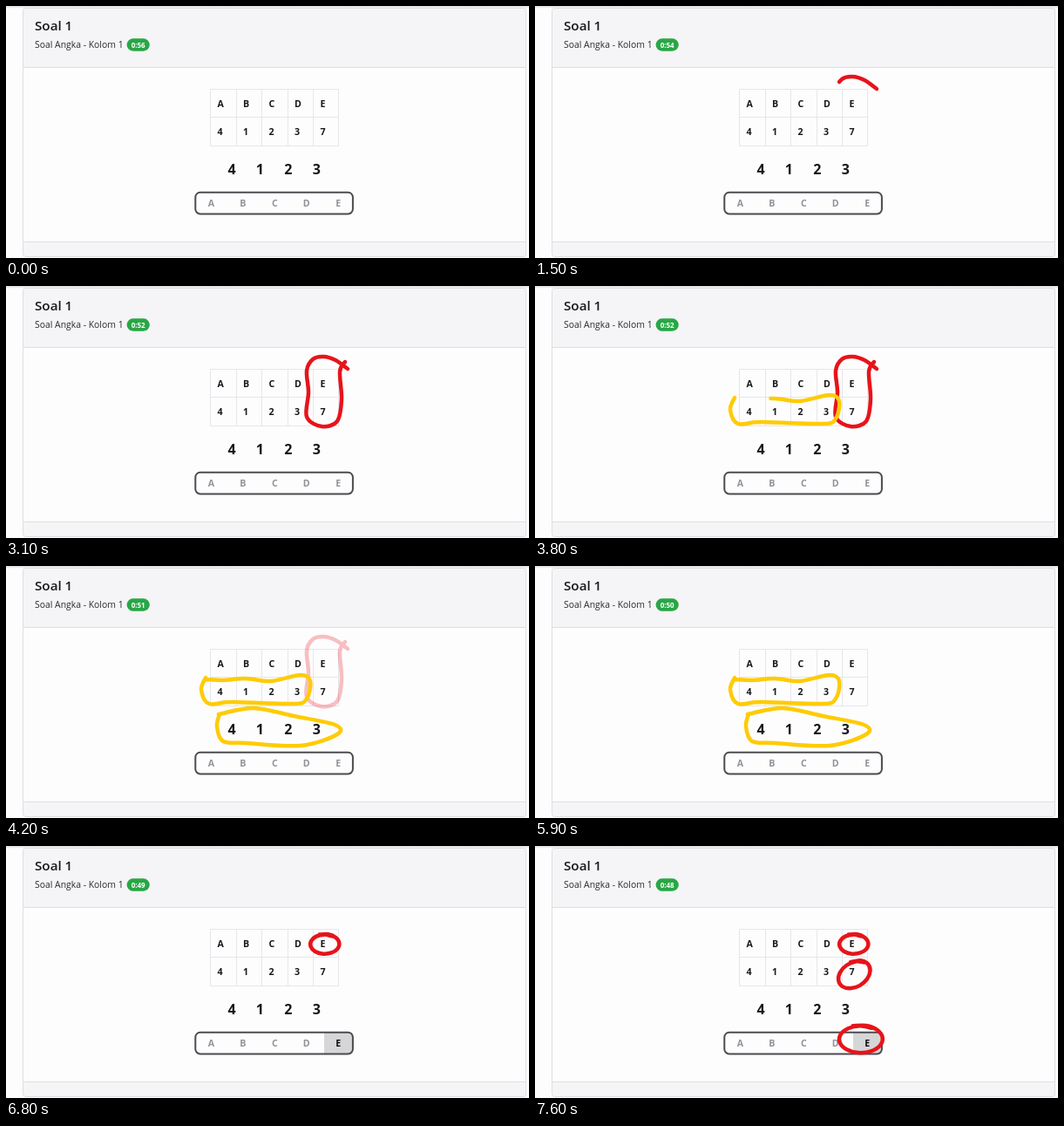
Recreate the animation shown at these times as an HTML page. Size 600 by 289 pixels, loop 8 s.

```html
<!DOCTYPE html>
<html lang="id">
<head>
<meta charset="utf-8">
<title>Soal Angka</title>
<style>
  html, body { margin: 0; width: 100%; height: 100%; overflow: hidden; background: #fefdfe; }
  svg { display: block; width: 100%; height: 100%; font-family: "Open Sans", "Noto Sans", sans-serif; fill: #17181c; }
  .panel { fill: #f5f4f6; }
  .card { fill: none; stroke: #dedde0; }
  .line { fill: none; stroke: #e6e5ea; }
  .cell, .big, .option { font-weight: 700; font-size: 10.6px; }
  .big, .option, #clock { text-anchor: middle; }
  .big { font-size: 16px; }
  .option { fill: #929297; }
  .option.on { fill: #0c0c0e; }
  #ink path { fill: none; stroke-width: 4.5; stroke-linecap: round; stroke-linejoin: round; }
</style>
</head>
<body>
<svg viewBox="0 0 600 289" preserveAspectRatio="none">
  <defs>
    <linearGradient id="shade" x2="0" y2="1">
      <stop stop-color="#dcdbde"/>
      <stop offset="1" stop-color="#fefdfe"/>
    </linearGradient>
  </defs>
  <rect width="600" height="3" fill="url(#shade)"/>
  <rect class="panel" x="20" y="3" width="577" height="67"/>
  <rect class="panel" x="20" y="271" width="577" height="16"/>
  <rect class="card" x="19.5" y="2.5" width="577" height="285" rx="3"/>
  <path class="card" d="M20 70.5H597M20 270.5H597"/>

  <text x="33" y="28" font-size="15.2" font-weight="600">Soal 1</text>
  <text x="33" y="48" font-size="10.4" fill="#2a2b30">Soal Angka - Kolom 1</text>
  <rect x="138.6" y="37.3" width="26.2" height="14.4" rx="7.2" fill="#28a745"/>
  <text id="clock" x="151.7" y="47.6" font-size="8" font-weight="700" fill="#fff">0:56</text>

  <g id="table"><path class="line" d="M234.5 95.5H381.5V160.5H234.5ZM234.5 127.5H381.5"/></g>
  <rect id="pick" x="365" y="214" width="32.5" height="24" fill="#d6d6d8"/>
  <rect x="217.3" y="213.8" width="180.6" height="24.6" rx="5.5" fill="none" stroke="#4b4b50" stroke-width="2"/>
  <g id="options"></g>
  <g id="ink"></g>
</svg>
<script>
const $ = id => document.getElementById(id);
const LOOP = 8000, STEP = 100, PICK = 6100;
const RED = "#e6141a", YELLOW = "#ffcb05";

function add(parent, tag, attrs, text = "") {
  const el = document.createElementNS("http://www.w3.org/2000/svg", tag);
  for (const k in attrs) el.setAttribute(k, attrs[k]);
  el.textContent = text;
  return $(parent).appendChild(el);
}

const row = (parent, style, chars, x, gap, y) =>
  [...chars].map((c, i) => add(parent, "text", { class: style, x: x + gap * i, y }, c));

for (let i = 1; i < 5; i++)
  add("table", "path", { class: "line", d: `M${Math.round(234.4 + 29.4 * i) + .5} 95V160` });
row("table", "cell", "ABCDE", 242.6, 29.5, 115.5);
row("table", "cell", "41237", 242.6, 29.5, 148);
row("table", "big", "4123", 259, 32.4, 193);
const options = row("options", "option", "ABCDE", 235.4, 36.45, 230);

// Catmull-Rom curve through the given points
function smooth(points) {
  const at = i => points[Math.max(0, Math.min(points.length - 1, i))];
  let d = "M" + points[0];
  for (let i = 0; i < points.length - 1; i++) {
    const [a, b, c, e] = [at(i - 1), at(i), at(i + 1), at(i + 2)];
    const p = b.map((v, k) => v + (c[k] - a[k]) / 6);
    const q = c.map((v, k) => v - (e[k] - b[k]) / 6);
    d += `C${p} ${q} ${c}`;
  }
  return d;
}

// Hand-drawn ring: counterclockwise, a little over one turn, slightly widening
function ring(cx, cy, rx, ry, tilt = 0) {
  return Array.from({ length: 13 }, (_, i) => {
    const a = -1 - i * .6, r = .94 + i * .006;
    const x = rx * r * Math.cos(a), y = ry * r * Math.sin(a);
    return [cx + x - tilt * y, cy + y - tilt * x];
  });
}

function pen(color, start, end, fade, points) {
  const el = add("ink", "path", { d: smooth(points), stroke: color });
  return { el, start, end, fade, len: el.getTotalLength() };
}

const strokes = [
  pen(RED, 1250, 2400, 3850, [[392, 95], [378, 85], [364, 81], [352, 84], [345, 97], [347, 122],
    [345, 150], [362, 161], [380, 155], [385, 130], [383, 98], [389, 87]]),
  pen(YELLOW, 3500, 3850, 5950, [[229, 128], [224, 142], [233, 158], [260, 156], [330, 158], [345, 152],
    [349, 132], [338, 125], [304, 132], [275, 129], [250, 131], [229, 130]]),
  pen(YELLOW, 3850, 4200, 5950, [[245, 170], [242, 184], [249, 201], [275, 203], [338, 206], [380, 193],
    [377, 182], [330, 172], [284, 163], [244, 170]]),
  pen(RED, 6400, 6750, LOOP, ring(365.5, 112.5, 17, 11.5)),
  pen(RED, 6850, 7200, LOOP, ring(366, 147.5, 18.5, 16, .15)),
  pen(RED, 7200, 7600, LOOP, ring(373.5, 221.5, 25.5, 16))
];

const clamp = v => Math.max(0, Math.min(1, v));

function draw(time) {
  const t = Math.floor(time % LOOP / STEP) * STEP;
  $("clock").textContent = "0:" + (56 - Math.floor((t + 900) / 1000));
  $("pick").style.opacity = t >= PICK ? 1 : 0;
  options[4].classList.toggle("on", t >= PICK);

  for (const { el, start, end, fade, len } of strokes) {
    const done = clamp((t - start) / (end - start));
    el.style.strokeDasharray = done < 1 ? `${len * done} ${len * 2}` : "none";
    el.style.opacity = done && 1 - clamp((t - fade) / 480);
  }
}

const began = performance.now();
function loop() {
  draw(performance.now() - began);
  requestAnimationFrame(loop);
}
loop();
</script>
</body>
</html>
```
